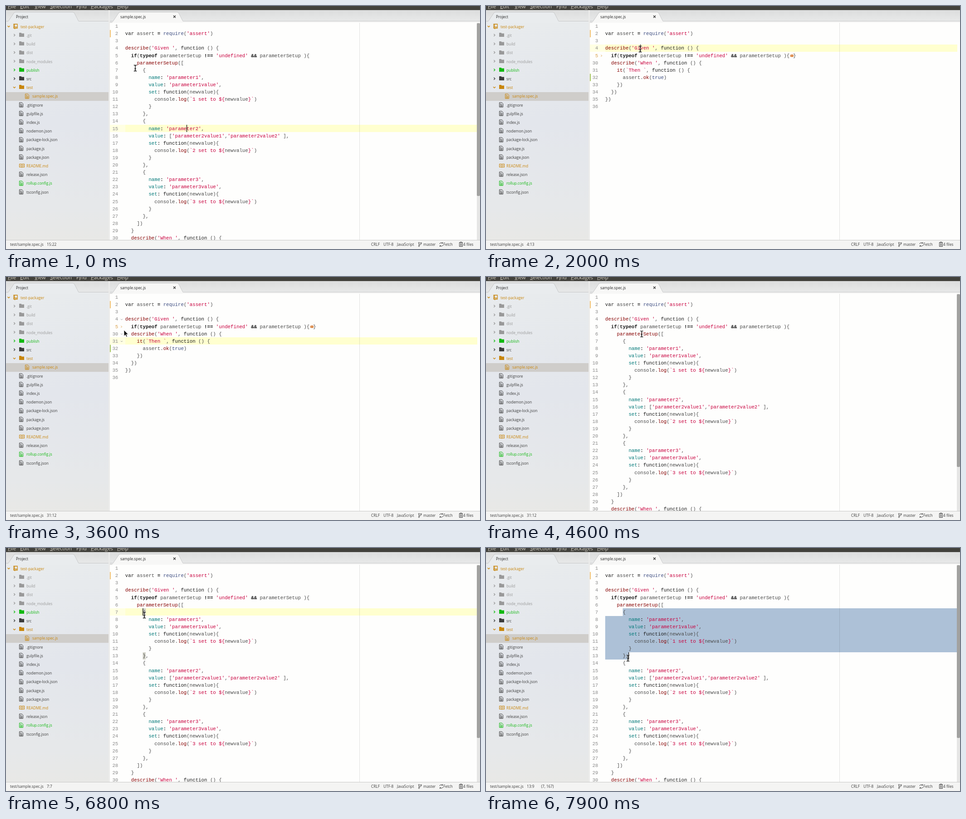
An HTML page that plays this animation: 1045 px wide and 536 px high, repeating every 8 s.

```html
<!DOCTYPE html>
<html lang="en">
<head>
<meta charset="utf-8">
<title>Editor folding demo</title>
<style>
  html, body { margin: 0; width: 100%; height: 100%; overflow: hidden; background: #fefefd; }
  svg { display: block; width: 1045px; height: 536px; }
  text { font-family: "Open Sans", "Noto Sans", sans-serif; font-size: 8.3px; fill: #3c3c3c; white-space: pre; }
  .menu text { font-size: 11.4px; fill: #d6d2c8; }
  .code text { font-family: "Liberation Mono", "DejaVu Sans Mono", monospace; font-size: 10.75px; fill: #4a4a4a; }
  .code .num { fill: #8c8c8c; text-anchor: end; }
  .code .tan { fill: #d9a04a; }
  .str { fill: #c8003e; }
  .op { fill: #1a1a1a; font-weight: bold; }
  .fn { fill: #860000; }
  .kw { fill: #1a1a1a; }
  .key { fill: #007878; }
  .sup { fill: #3c4c80; }
  .line { fill: none; stroke-width: 1; }
</style>
</head>
<body>
<script type="text/plain" id="source">

var assert = require('assert')

describe('Given ', function () {
  if(typeof parameterSetup !== 'undefined' && parameterSetup ){
    parameterSetup([
      {
        name: 'parameter1',
        value: 'parameter1value',
        set: function(newvalue){
          console.log(`1 set to ${newvalue}`)
        }
      },
      {
        name: 'parameter2',
        value: ['parameter2value1','parameter2value2' ],
        set: function(newvalue){
          console.log(`2 set to ${newvalue}`)
        }
      },
      {
        name: 'parameter3',
        value: 'parameter3value',
        set: function(newvalue){
          console.log(`3 set to ${newvalue}`)
        }
      },
    ])
  }
  describe('When ', function () {
    it(`Then `, function () {
      assert.ok(true)
    })
  })
})
</script>
<svg viewBox="0 0 1045 536">
  <defs>
    <linearGradient id="side" x2="0" y2="1">
      <stop stop-color="#e8ebed"/><stop offset=".45" stop-color="#e3e6ec"/>
      <stop offset=".85" stop-color="#e6e8ea"/><stop offset="1" stop-color="#e8e8e6"/>
    </linearGradient>
    <linearGradient id="bar" x2="0" y2="1">
      <stop stop-color="#dcdddd"/><stop offset="1" stop-color="#e9eaea"/>
    </linearGradient>
    <clipPath id="pane"><rect x="229" y="37" width="816" height="479"/></clipPath>
  </defs>
  <rect x="229" y="37" width="816" height="479" fill="#fefefd"/>
  <g clip-path="url(#pane)">
    <g id="active">
      <rect x="229" width="34" height="16" fill="#ffffe2"/>
      <rect x="263" width="776" height="16" fill="#ffffcf"/>
    </g>
    <path id="match" fill="#d2d2c8"/>
    <path id="selection" fill="#adc1d7"/>
    <path d="M779.5 37V516" stroke="#000" stroke-opacity=".11"/>
    <g id="full" class="code"></g>
    <g id="folded" class="code"></g>
    <rect id="caret" width="1.2" height="16" fill="#000"/>
    <g id="scroll"><rect x="1038" y="37" width="7" height="479" fill="#e6e6e5"/><rect x="1038" y="38" width="7" height="381" rx="2" fill="#a2a2a0"/></g>
  </g>
  <rect y="9" width="1045" height="28" fill="url(#bar)"/>
  <path d="M229 36.5H1045" stroke="#cfcfce"/>
  <rect y="37" width="226" height="479" fill="url(#side)"/>
  <rect x="226" y="9" width="3" height="507" fill="#ebebea"/>
  <path d="M4 37L17 16Q18 14 21 14H147Q150 14 151 16L161 34H226V37Z" fill="#e9ecee"/>
  <path class="line" d="M0 33.5H5L17 16Q18 13.500 21 13.500H147Q150 13.500 151 16L160 33.500H226" stroke="#c6c7c8"/>
  <path d="M234 37L248 16Q249 14 252 14H377Q380 14 381 16L391 34H1045V37Z" fill="#f7f7f6"/>
  <path class="line" d="M229 33.5H236L248 16Q249 13.500 252 13.500H377Q380 13.500 381 16L390 33.500H1045" stroke="#c6c7c8"/>
  <text x="22" y="27" style="fill:#222">Project</text>
  <text x="252" y="27" style="fill:#222">sample.spec.js</text>
  <path class="line" d="M369 21l5 5m0-5l-5 5" stroke="#333" style="stroke-width:1.3"/>
  <rect width="1045" height="9" fill="#42413c"/>
  <g class="menu" id="menu"></g>
  <g id="tree"></g>
  <rect y="516" width="1045" height="20" fill="#f4f4f3"/>
  <path d="M0 516.5H1045" stroke="#c9c9c8"/>
  <g id="status">
    <text x="9" y="529">test/sample.spec.js</text>
    <text x="90" y="529" id="position"></text>
    <text x="805" y="529">CRLF</text><text x="832" y="529">UTF-8</text>
    <text x="862" y="529">JavaScript</text><text x="920" y="529">master</text>
    <text x="964" y="529">Fetch</text><text x="1008" y="529">4 files</text>
    <g class="line" stroke="#444">
      <path d="M910.5 523v6M915 524v1q0 2-4 2"/>
      <g fill="#f4f4f3"><circle cx="910.5" cy="522.5" r="1.2"/><circle cx="910.5" cy="529.5" r="1.2"/><circle cx="915" cy="523" r="1.2"/></g>
      <path d="M956 525a3.6 3.6 0 0 1 6.5-1.5v-2.5m0 2.5h-2.5M963 527a3.6 3.6 0 0 1-6.5 1.5v2.5m0-2.5h2.5"/>
      <path d="M1001 521.5h-1.5v9h7v-9h-1.5M1001.5 520.5h3v2h-3zM1001 525.5h4M1003 523.5v4M1001 528.5h4"/>
    </g>
  </g>
  <g id="arrow"><path d="M0 0V13.5L3.2 10.5L5.3 15.2L7.5 14.2L5.4 9.7H9.5Z" fill="#111" stroke="#fff" stroke-width=".9" stroke-linejoin="round"/></g>
  <g id="beam" class="line">
    <path id="stem" d="M-3.2-6.5H-1.5Q0-6.5 0-5V5Q0 6.5-1.5 6.5H-3.2M3.2-6.5H1.5Q0-6.5 0-5V5Q0 6.5 1.5 6.5H3.2M-1.8 1.5H1.8" stroke="#111" style="stroke-width:1.4"/>
  </g>
</svg>
<script>
const LOOP = 8000, TOP = 36.8, LEFT = 262.8, ROW = 16.1, COL = 6.45, RIGHT = 1038;
const $ = id => document.getElementById(id);
const esc = s => s.replace(/&/g, '&amp;').replace(/</g, '&lt;');
const colX = c => LEFT + c * COL;
const rowY = r => TOP + (r - 1) * ROW;
const snapY = r => Math.round(rowY(r));
const show = (el, on) => { el.style.display = on ? '' : 'none'; };

// Menu bar: label, x, offset of the underlined letter
$('menu').innerHTML = [['File', 4], ['Edit', 31], ['View', 63], ['Selection', 97], ['Find', 155, 6], ['Packages', 187], ['Help', 245]]
  .map(([s, x, dx = 0]) => `<text x="${x}" y="4.5">${s}</text><path d="M${x + dx} 6h${dx ? 3 : 6.5}" stroke="#d6d2c8" stroke-width=".8"/>`).join('');

// Project tree
const TAN = '#c8860e', GREEN = '#12b912', GREY = '#999', DARK = '#3c3c3c';
const icons = {
  folder: (x, y, c) => `<path d="M${x} ${y - 5}h4.5l1 1.5h5.5v7.5h-11z" fill="${c}"/>`,
  file: (x, y, c) => `<path class="line" d="M${x + .5} ${y - 5}h5.5l2.5 2.5v7.5h-8zM${x + 2} ${y - 2}h3m-3 2h5m-5 2h5m-5 1.8h5" stroke="${c}"/>`,
  book: (x, y, c) => `<path class="line" d="M${x + .5} ${y - 3.5}h4.5l1 .8l1-.8h4.5v7h-4.5l-1 .8l-1-.8h-4.5zM${x + 6} ${y - 3}v7M${x + 2} ${y - 1}h2.5m-2.5 2h2.5m3-2h2.5m-2.5 2h2.5" stroke="${c}"/>`,
  repo: (x, y, c) => `<path class="line" d="M${x + 1} ${y - 5}h8v9h-8zM${x + 1} ${y + 1.5}h8M${x + 3} ${y - 5}v6M${x + 3.5} ${y + 3}v3" stroke="${c}" style="stroke-width:1.3"/>`
};
const chevron = (x, y, open, c, s = 2, w = 1) => `<path class="line" d="${open
  ? `M${x - s} ${y - s / 2}l${s} ${s}l${s}-${s}` : `M${x - s / 2} ${y - s}l${s} ${s}l-${s} ${s}`}" stroke="${c}" style="stroke-width:${w}"/>`;
const tree = [
  ['test-packager', TAN, 'repo', 0, 1], ['.git', GREY, 'folder', 1, 0], ['build', GREY, 'folder', 1, 0],
  ['dist', GREY, 'folder', 1, 0], ['node_modules', GREY, 'folder', 1, 0], ['publish', GREEN, 'folder', 1, 0],
  ['src', DARK, 'folder', 1, 0], ['test', TAN, 'folder', 1, 1], ['sample.spec.js', TAN, 'file', 2],
  ...['.gitignore', 'gulpfile.js', 'index.js', 'nodemon.json', 'package-lock.json', 'package.js', 'package.json'].map(s => [s, DARK, 'file', 1]),
  ['README.md', TAN, 'book', 1], ['release.json', DARK, 'file', 1], ['rollup.config.js', GREEN, 'file', 1], ['tsconfig.json', DARK, 'file', 1]
];
$('tree').innerHTML = '<rect y="190" width="226" height="19.2" fill="#cfcdca"/>' + tree.map(([name, color, icon, depth, open], i) => {
  const y = 45.5 + i * 19.2, x = 32 + depth * 13;
  return (open === undefined ? '' : chevron(6 + depth * 12.5, y - .5, open, color, 2.5, 1.4))
    + icons[icon](x - 16, Math.round(y - .5), color) + `<text x="${x}" y="${y + 3.2}" style="fill:${color}">${name}</text>`;
}).join('');

// Source code
const token = /('[^']*'|`[^`$]*`?|\$\{|\}`)|(\b(?:if|typeof)\b|!==|&&|=|:)|(\b(?:describe|it|ok|log)\b|parameterSetup(?=\(\[))|(\b(?:function|var)\b)|(\b(?:name|value|set)(?=:))|(\b(?:require|true)\b)/g;
const classes = ['str', 'op', 'fn', 'kw', 'key', 'sup'];
const paint = line => {
  let out = '', last = 0;
  for (const m of line.matchAll(token)) {
    const kind = classes[m.slice(1).findIndex(Boolean)];
    out += esc(line.slice(last, m.index)) + `<tspan class="${kind}">${esc(m[0])}</tspan>`;
    last = m.index + m[0].length;
  }
  return out + esc(line.slice(last));
};
const lines = $('source').textContent.slice(1).split('\n');
const allRows = lines.map((_, i) => i + 1);
const foldRows = allRows.filter(n => n <= 5 || n >= 30);

function buildView(rows, isFolded) {
  let text = '', folds = '';
  rows.forEach((n, i) => {
    const y = rowY(i + 1), base = y + 11.3, line = lines[n - 1], shut = isFolded && n === 5;
    if (y > 516) return;
    text += `<text class="num${shut ? ' tan' : ''}" x="247.3" y="${base}">${n}</text><text x="${LEFT}" y="${base}">${paint(line)}</text>`;
    if (n === 2 || n === 32) text += `<rect x="229" y="${y}" width="2" height="${ROW}" fill="${n === 2 ? '#f3c374' : '#a5c65c'}"/>`;
    if (shut) {
      text += chevron(254.5, y + 8.5, 0, '#d9a04a') + `<rect x="671" y="${y + 6}" width="7" height="5" rx="1.5" fill="#d5782f"/>`
        + `<path d="M672.5 ${y + 8.5}h4" stroke="#fff" stroke-dasharray="1 .5"/><text x="${colX(64.2)}" y="${base}">}</text>`;
    } else if (/[{[]$/.test(line)) folds += chevron(255, y + 8.5, 1, '#999');
  });
  return text + `<g class="folds">${folds}</g>`;
}
$('full').innerHTML = buildView(allRows, false);
$('folded').innerHTML = buildView(foldRows, true);
const folds = document.querySelectorAll('.folds');

// Light outline behind the text pointer
const halo = $('stem').cloneNode();
halo.removeAttribute('id');
halo.setAttribute('style', 'stroke:#fff;stroke-width:2.6;opacity:.6');
$('beam').prepend(halo);

// Pointer path: time, x, y
const path = [
  [0, 285, 137], [100, 262, 120], [200, 254, 111], [400, 254, 111], [800, 252, 108], [1100, 252, 108],
  [1200, 330, 128], [1400, 772, 141], [1500, 772, 141], [1600, 640, 130], [1800, 370, 104], [2000, 340, 95],
  [2100, 340, 95], [2400, 360, 93], [2600, 360, 128], [3000, 360, 128], [3200, 343, 142], [3300, 343, 142],
  [3400, 317, 143], [3500, 317, 143], [3600, 260, 117], [3800, 253, 106], [4200, 253, 106], [4300, 262, 110],
  [4500, 330, 125], [4800, 370, 127], [5100, 290, 125], [5200, 290, 125], [5400, 318, 125], [5500, 290, 125],
  [5700, 388, 126], [6100, 388, 126], [6500, 305, 150], [6600, 305, 150], [6700, 305, 148], [6800, 305, 148],
  [7000, 340, 183], [7100, 340, 183], [7300, 376, 228], [7400, 376, 228], [7500, 313, 240], [7800, 313, 240], [7900, 313, 243]
];
// Editor changes; rows are visible rows, caret is [row, column], sel is its anchor
const steps = [
  [0, { folded: 0, active: 15, caret: [15, 21], sel: 0, match: 0, pos: '15:22', count: '' }],
  [500, { folded: 1, active: 5, caret: 0 }],
  [1900, { active: 4, caret: [4, 12], pos: '4:13' }],
  [2200, { active: 0, sel: [4, 12], caret: [4, 14], pos: '4:15', count: '(1, 2)' }],
  [2400, { caret: [4, 16], pos: '4:17', count: '(1, 4)' }],
  [2800, { sel: 0, caret: [6, 15], pos: '30:16', count: '' }],
  [3100, { active: 6 }],
  [3200, { active: 7, caret: [7, 11], pos: '31:12' }],
  [3400, { caret: 0 }],
  [3900, { folded: 0, active: 0 }],
  [5200, { active: 6, caret: [6, 4], pos: '6:5' }],
  [5300, { active: 0, sel: [6, 4], caret: [6, 6], pos: '6:7', count: '(1, 2)' }],
  [5400, { caret: [6, 8], pos: '6:8', count: '(1, 3)' }],
  [5500, { caret: [6, 9], pos: '6:9', count: '(1, 4)' }],
  [5600, { caret: [6, 14], pos: '6:15', count: '(1, 10)' }],
  [5700, { caret: [6, 19], pos: '6:20', count: '(1, 15)' }],
  [5900, { blink: 1 }],
  [6700, { blink: 0, active: 7, sel: 0, match: 1, caret: [7, 6], pos: '7:7', count: '' }],
  [6900, { active: 0, match: 0, sel: [7, 6], caret: [8, 8], pos: '8:9', count: '(2, 11)' }],
  [7000, { caret: [10, 12], pos: '10:13', count: '(4, 79)' }],
  [7200, { caret: [11, 15], pos: '11:16', count: '(5, 116)' }],
  [7300, { caret: [13, 8], pos: '13:9', count: '(7, 167)' }],
  [7700, { blink: 1 }],
  [7900, { blink: 0 }]
];

const box = (row, from, to) => `M${from} ${snapY(row)}H${to}V${snapY(row + 1)}H${from}z`;
function selectionPath([r0, c0], [r1, c1]) {
  let d = '';
  for (let r = r0; r <= r1; r++) d += box(r, r === r0 ? colX(c0) : LEFT, r === r1 ? colX(c1) : RIGHT);
  return d;
}
function pointerAt(t) {
  const i = path.findLastIndex(p => p[0] <= t), a = path[i], b = path[i + 1] || a;
  const k = b === a ? 0 : (t - a[0]) / (b[0] - a[0]);
  return [a[1] + (b[1] - a[1]) * k, a[2] + (b[2] - a[2]) * k];
}

function draw(t) {
  const s = Object.assign({}, ...steps.filter(p => p[0] <= t).map(p => p[1]));
  const [x, y] = pointerAt(t), gutter = x < 270;
  show($('full'), !s.folded);
  show($('scroll'), !s.folded);
  show($('folded'), s.folded);
  folds.forEach(f => show(f, gutter));
  show($('active'), s.active);
  $('active').setAttribute('transform', `translate(0 ${snapY(s.active)})`);
  $('match').setAttribute('d', s.match ? box(7, colX(6), colX(7)) + box(13, colX(6), colX(7)) : '');
  $('selection').setAttribute('d', s.sel ? selectionPath(s.sel, s.caret) : '');
  show($('caret'), s.caret && !s.blink);
  if (s.caret) {
    $('caret').setAttribute('x', colX(s.caret[1]) - .3);
    $('caret').setAttribute('y', snapY(s.caret[0]));
  }
  $('position').innerHTML = s.pos + (s.count && `<tspan dx="15">${s.count}</tspan>`);
  show($('arrow'), gutter);
  show($('beam'), !gutter);
  $(gutter ? 'arrow' : 'beam').setAttribute('transform', `translate(${x} ${y})`);
}

let shown = -1;
function tick(now) {
  const t = Math.floor(now % LOOP / 100) * 100;
  if (t !== shown) draw(shown = t);
  requestAnimationFrame(tick);
}
draw(0);
requestAnimationFrame(tick);
</script>
</body>
</html>
```
